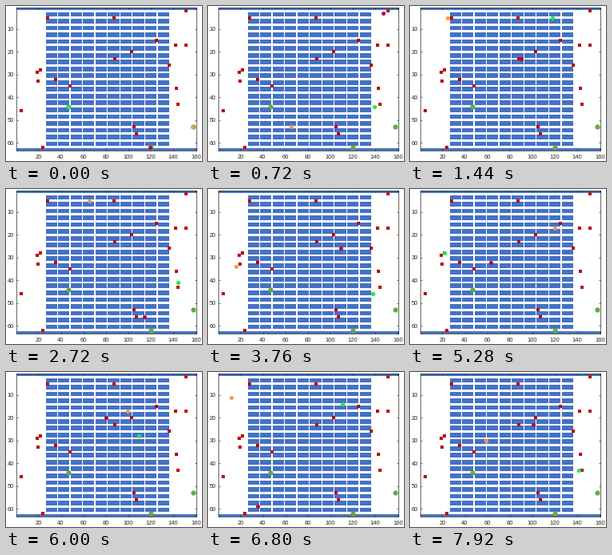
These frames come from a looping animation (245 by 194 pixels, 8000 ms). A matplotlib script:

```python
import numpy as np
import matplotlib.pyplot as plt
from matplotlib.animation import FuncAnimation
from matplotlib.colors import ListedColormap

W, H, DPI = 245, 194, 100
FRAMES, INTERVAL = 100, 80
COLS, ROWS = 160, 63
SPEED = 9.5  # cells per frame
INK = "#262626"

# Shelves of 10 x 2 cells with one-cell aisles, walls along top and bottom
y, x = np.mgrid[1:ROWS + 1, 1:COLS + 1]
shelf = (x > 26) & (x < 136) & (x % 11 != 4) & (y > 2) & (y < 62) & (y % 3 != 2)
wall = (y == 1) | (y == ROWS)

fig = plt.figure(figsize=(W / DPI, H / DPI), dpi=DPI, facecolor="white")
ax = fig.add_axes([13 / W, 1 - 181 / H, 225 / W, 179 / H])
ax.imshow(shelf | wall, cmap=ListedColormap(["white", "#4472c4"]),
          extent=(0.5, COLS + 0.5, ROWS + 0.5, 0.5),
          aspect="auto", interpolation="nearest")
ax.set_xticks(range(20, COLS + 1, 20))
ax.set_yticks(range(10, ROWS, 10))
ax.tick_params(direction="in", top=True, right=True, length=1.5, width=0.5,
               color=INK, labelcolor=INK, labelsize=5.5,
               labelfontfamily="Liberation Sans")
ax.tick_params(axis="x", pad=3.4)
ax.tick_params(axis="y", pad=2)
for spine in ax.spines.values():
    spine.set(linewidth=0.5, color=INK)


def markers(points, shape, size, color, z):
    dots, = ax.plot(*zip(*points), shape, ms=size, mfc=color, mew=0,
                    zorder=z, clip_on=False)
    return dots


items = [(28, 5), (87, 5), (151, 2), (125, 15), (142, 17), (151, 17),
         (103, 20), (88, 23), (136, 26), (143, 36), (144, 43), (48, 35),
         (35, 32), (20, 33), (19, 29), (22, 28), (5, 46), (24, 62),
         (105, 53), (107, 56)]
markers(items, "s", 3, "#c00000", 4)

# Stops of each robot, from its depot, at shared key times
KEYS = [0, 18, 34, 47, 66, 85, 99]
TOURS = {
    "#f79a50": [(157, 53), (25, 5), (65, 5), (16, 34), (120, 17), (12, 11),
                (59, 30)],
    "#18f040": [(47, 44), (118, 5), (144, 41), (138, 46), (22, 28), (111, 14),
                (141, 43)],
    "#b8083c": [(119, 62), (90, 23), (114, 56), (109, 26), (63, 32), (35, 59),
                (101, 23)],
}
markers([(158, 53), (47, 44), (120, 62)], "o", 4.5, "#5fae38", 3)


def distance(a, b):
    return abs(a[0] - b[0]) + abs(a[1] - b[1])


def drive(a, b):
    """Corners from a to b: along the row, up or down an aisle, then to b."""
    aisle = 4 + 11 * round((b[0] - 4) / 11)
    return [(aisle, a[1]), (aisle, b[1]), b]


def leg(a, b, steps):
    """Positions from a to b by way of the item that best fills the time."""
    item = min(items, key=lambda p: abs(distance(a, p) + distance(p, b)
                                        - SPEED * steps))
    path = np.array([a] + drive(a, item) + drive(item, b), float)
    travelled = np.r_[0, np.abs(np.diff(path, axis=0)).sum(axis=1).cumsum()]
    s = np.linspace(0, travelled[-1], steps + 1)
    return np.round([np.interp(s, travelled, axis) for axis in path.T]).T


def track(stops):
    legs = [leg(a, b, t1 - t0)[1:] for a, b, t0, t1
            in zip(stops, stops[1:], KEYS, KEYS[1:])]
    return np.vstack([stops[:1]] + legs)


robots = [(markers(stops[:1], "o", 3.7, color, 5), track(stops))
          for color, stops in TOURS.items()]


def update(i):
    for dot, cells in robots:
        dot.set_data(cells[i, :1], cells[i, 1:])
    return [dot for dot, _ in robots]


anim = FuncAnimation(fig, update, frames=FRAMES, interval=INTERVAL,
                     repeat=True, repeat_delay=0)
plt.show()
```
